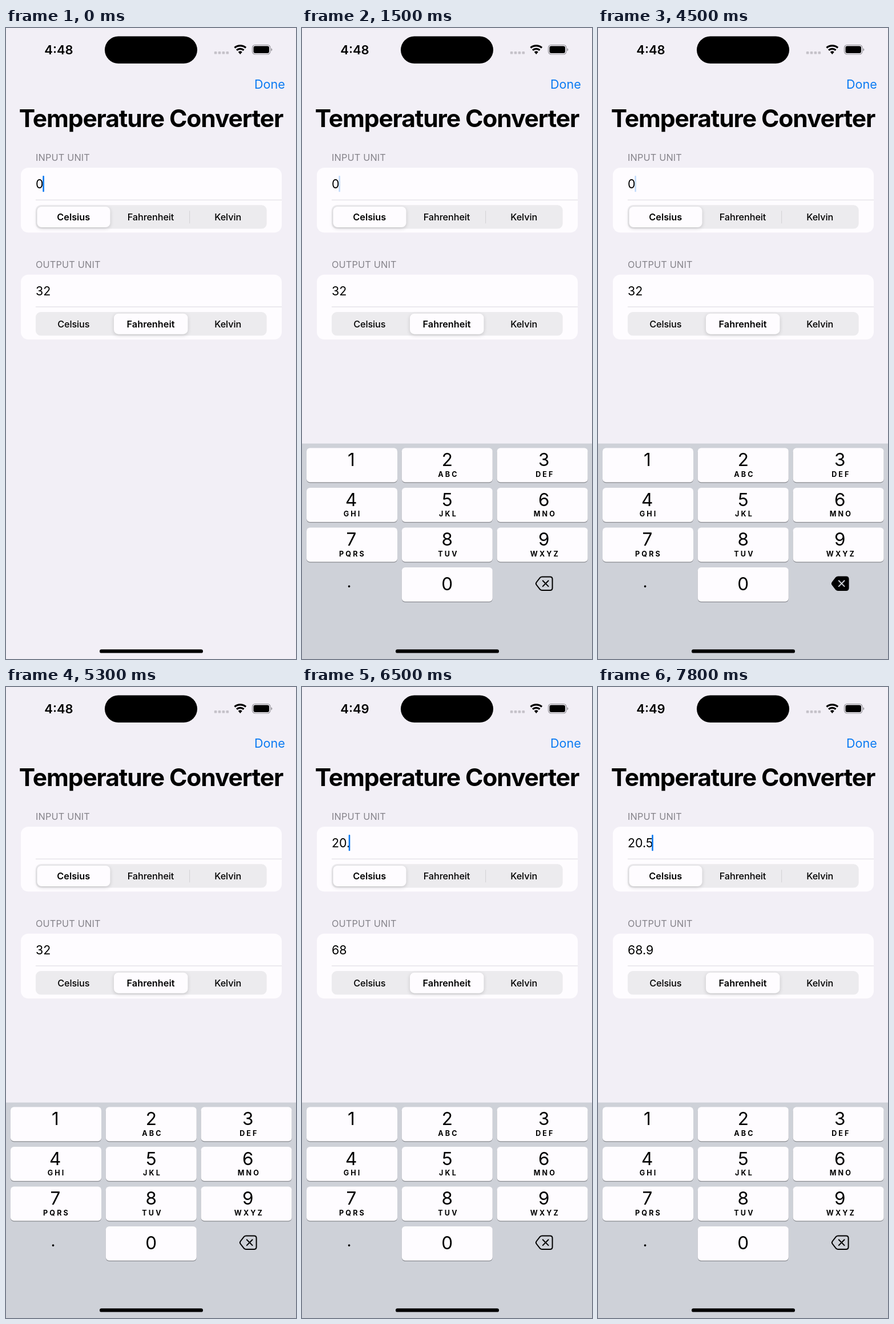
These frames come from a looping animation (508 px wide and 1102 px high, 8000 ms). An HTML page:

```html
<!DOCTYPE html>
<html lang="en">
<head>
<meta charset="utf-8">
<title>Temperature Converter</title>
<style>
  html, body { margin: 0; width: 100%; height: 100%; overflow: hidden; background: #f2eff6; }
  svg { display: block; width: 508px; height: 1102px; }
  text { font-family: Inter, Roboto, sans-serif; font-optical-sizing: none; white-space: pre; }
  .mid { text-anchor: middle; }
  .clock { font-size: 22px; font-weight: 600; }
  .title { font-size: 42.6px; font-weight: 700; letter-spacing: -1.15px; }
  .done { font-size: 21.6px; fill: #0a7af2; text-anchor: end; }
  .label { font-size: 16.3px; fill: #85838a; letter-spacing: .15px; }
  .value { font-size: 21.4px; }
  .seg { font-size: 16.3px; font-weight: 500; letter-spacing: -.1px; }
  .seg.on { font-weight: 600; letter-spacing: 0; }
  .digit { font-size: 31.5px; }
  .letters { font-size: 12.6px; font-weight: 700; letter-spacing: 3.1px; }
  .dot { font-size: 28px; }
  .pill { fill: #fefcff; filter: drop-shadow(0 2px 3px rgba(0, 0, 0, .16)); }
</style>
</head>
<body>
<svg id="stage" viewBox="0 0 508 1102"></svg>
<script>
const LOOP = 8000;
const WHITE = '#fefcff', KEYBOARD = '#ced1d8', PRESSED = '#b2bdcd';
const stage = document.getElementById('stage');

function add(parent, tag, attrs, content) {
  const node = document.createElementNS('http://www.w3.org/2000/svg', tag);
  for (const name in attrs) node.setAttribute(name, attrs[name]);
  if (content !== undefined) node.textContent = content;
  parent.appendChild(node);
  return node;
}
const rect = (parent, x, y, width, height, rx, fill) =>
  add(parent, 'rect', { x, y, width, height, rx, fill });
const text = (parent, cls, x, y, content) =>
  add(parent, 'text', { class: cls, x, y }, content);

// Status bar
const clock = text(stage, 'clock mid', 92.5, 46, '4:48');
rect(stage, 173, 14.5, 162, 47.5, 23.75, '#000');
for (let i = 0; i < 4; i++) rect(stage, 364.8 + i * 6.9, 41, 4.6, 4.6, 1.2, '#c5c2c9');

function arc(r) {
  const dx = r * Math.sin(0.71), y = 46 - r * Math.cos(0.71);
  return `M${410.3 - dx} ${y}A${r} ${r} 0 0 1 ${410.3 + dx} ${y}`;
}
add(stage, 'path', { d: arc(15.1), fill: 'none', stroke: '#000', 'stroke-width': 3.3 });
add(stage, 'path', { d: arc(9.6), fill: 'none', stroke: '#000', 'stroke-width': 3.2 });
add(stage, 'path', { d: arc(5.5) + 'L410.3 46Z' });

add(stage, 'rect', { x: 431.5, y: 29.5, width: 31.5, height: 16.5, rx: 5, fill: 'none', stroke: '#96949a', 'stroke-width': 1.2 });
rect(stage, 433.5, 31.5, 27.5, 12.5, 3.2, '#000');
add(stage, 'path', { d: 'M464.4 35.2q2 .8 2 2.6t-2 2.6z', fill: '#96949a' });

// Form
text(stage, 'done', 488.8, 106.2, 'Done');
text(stage, 'title mid', 254, 173.3, 'Temperature Converter');

function section(top, label, selected, divider) {
  const g = add(stage, 'g', { transform: `translate(0 ${top})` });
  text(g, 'label', 52, -12, label);
  rect(g, 26, 0, 457, 113.3, 13, WHITE);
  rect(g, 52, 55.8, 431, 1, 0, '#dcdadf');
  rect(g, 52, 65.3, 404.7, 41.3, 9, '#ecebee');
  if (divider) rect(g, 321, 75.2, 1.2, 22, 0.5, '#d5d4d8');
  add(g, 'rect', { class: 'pill', x: selected ? 189 : 54.5, y: 68, width: selected ? 129.5 : 128, height: 36, rx: 8 });
  ['Celsius', 'Fahrenheit', 'Kelvin'].forEach((unit, i) =>
    text(g, i === selected ? 'seg mid on' : 'seg mid', 118.3 + i * 135.2, 92, unit));
  return g;
}
const input = section(244, 'INPUT UNIT', 0, true);
const output = section(430.7, 'OUTPUT UNIT', 1, false);

const typed = text(input, 'value', 52, 36.4, '0');
const caret = rect(input, 64.3, 14, 2.6, 28.2, 1, '#0a78f0');
const result = text(output, 'value', 52, 36.4, '');
const fading = text(output, 'value', 52, 36.4, '');

// Keyboard
const pad = add(stage, 'g', {});
rect(pad, 0, 725.7, 508, 376.3, 0, KEYBOARD);
const columns = [8, 174.8, 341.6], middles = [86.3, 254.3, 423.7];
const letters = ['', 'ABC', 'DEF', 'GHI', 'JKL', 'MNO', 'PQRS', 'TUV', 'WXYZ'];
const keys = {};

function key(digit, col, row) {
  const y = 733.4 + row * 69.5, hint = letters[digit - 1];
  rect(pad, columns[col], y + 1.4, 159, 59.8, 6, '#898b90');
  keys[digit] = rect(pad, columns[col], y, 159, 59.8, 6, WHITE);
  text(pad, 'digit mid', middles[col], y + (digit ? 32 : 40), digit);
  if (hint) text(pad, 'letters mid', middles[col] + 2.2, y + 50.4, hint);
}
for (let n = 1; n < 10; n++) key(n, (n - 1) % 3, Math.floor((n - 1) / 3));
key(0, 1, 3);
text(pad, 'dot mid', 82.5, 977.3, '.');

const erase = add(pad, 'path', {
  d: 'M420.5 958.5H434.5Q438.6 958.5 438.6 962.5V978Q438.6 982 434.5 982H420.5Q418.5 982 417 980.5L410.7 972.5Q409 970.3 410.7 968L417 960Q418.5 958.5 420.5 958.5Z',
  stroke: '#000', 'stroke-width': 2
});
const cross = add(pad, 'path', {
  d: 'M421.8 965.3l9.8 9.8m0-9.8l-9.8 9.8', 'stroke-width': 2, 'stroke-linecap': 'round'
});

rect(stage, 164, 1085.2, 181, 6.4, 3.2, '#000');

// Each step changes part of the state from its time on.
const start = {
  time: '4:48', typed: '0', caretX: 64.3, caret: 1, pad: false,
  key: null, result: '32', next: '', mix: 0
};
const steps = [
  [500, { caret: .25 }], [600, { caret: 0 }],
  [1200, { caret: .5 }], [1300, { caret: 1 }],
  [1500, { caret: .25, pad: true }], [1600, { caret: .06 }], [1700, { caret: 0 }],
  [2200, { caret: .5 }], [2300, { caret: 1 }],
  [2500, { caret: .25 }], [2600, { caret: .06 }], [2700, { caret: 0 }],
  [3200, { caret: .5 }], [3300, { caret: 1 }],
  [3500, { caret: .25 }], [3600, { caret: .06 }], [3700, { caret: 0 }],
  [4200, { caret: .5 }], [4300, { caret: 1 }],
  [4400, { key: 'erase' }], [4500, { caret: .25 }],
  [4600, { typed: '', caretX: 51.3, caret: 1 }], [4700, { key: null }],
  [5100, { caret: .6 }], [5200, { caret: .2 }], [5300, { caret: 0 }],
  [5500, { key: 2 }], [5600, { caret: .5 }],
  [5700, { key: null, typed: '2', caretX: 63.3, caret: 1, next: '35.6', mix: .25 }],
  [5800, { key: 0, mix: .7 }],
  [5900, { result: '35.6', next: '', mix: 0 }],
  [6000, { key: null, typed: '20', caretX: 76.6, result: '68' }],
  [6400, { typed: '20.', caretX: 81.7 }],
  [6500, { time: '4:49' }],
  [7200, { key: 5 }],
  [7500, { key: null, typed: '20.5', caretX: 94.2, result: '68.9' }]
];

function setText(node, value) {
  if (node.textContent !== value) node.textContent = value;
}

// Characters shared by both values stay solid while the rest crossfades.
function showResult({ result: from, next: to, mix }) {
  let same = 0;
  while (to && from[same] === to[same]) same++;
  const state = from + '|' + to + '|' + mix;
  if (result.dataset.state === state) return;
  result.dataset.state = state;
  result.textContent = fading.textContent = '';
  add(result, 'tspan', {}, from.slice(0, same));
  add(result, 'tspan', { 'fill-opacity': 1 - mix }, from.slice(same));
  add(fading, 'tspan', { 'fill-opacity': 0 }, to.slice(0, same));
  add(fading, 'tspan', { 'fill-opacity': mix }, to.slice(same));
}

function draw(t) {
  const s = Object.assign({}, start);
  for (const [at, change] of steps) if (t >= at) Object.assign(s, change);

  setText(clock, s.time);
  setText(typed, s.typed);
  caret.setAttribute('x', s.caretX);
  caret.setAttribute('opacity', s.caret);
  showResult(s);

  pad.setAttribute('visibility', s.pad ? 'visible' : 'hidden');
  for (const name in keys) keys[name].setAttribute('fill', String(s.key) === name ? PRESSED : WHITE);
  const erasing = s.key === 'erase';
  erase.setAttribute('fill', erasing ? '#000' : 'none');
  cross.setAttribute('stroke', erasing ? KEYBOARD : '#000');
}

const begin = performance.now();
function frame() {
  draw((performance.now() - begin) % LOOP);
  requestAnimationFrame(frame);
}
frame();
</script>
</body>
</html>
```
